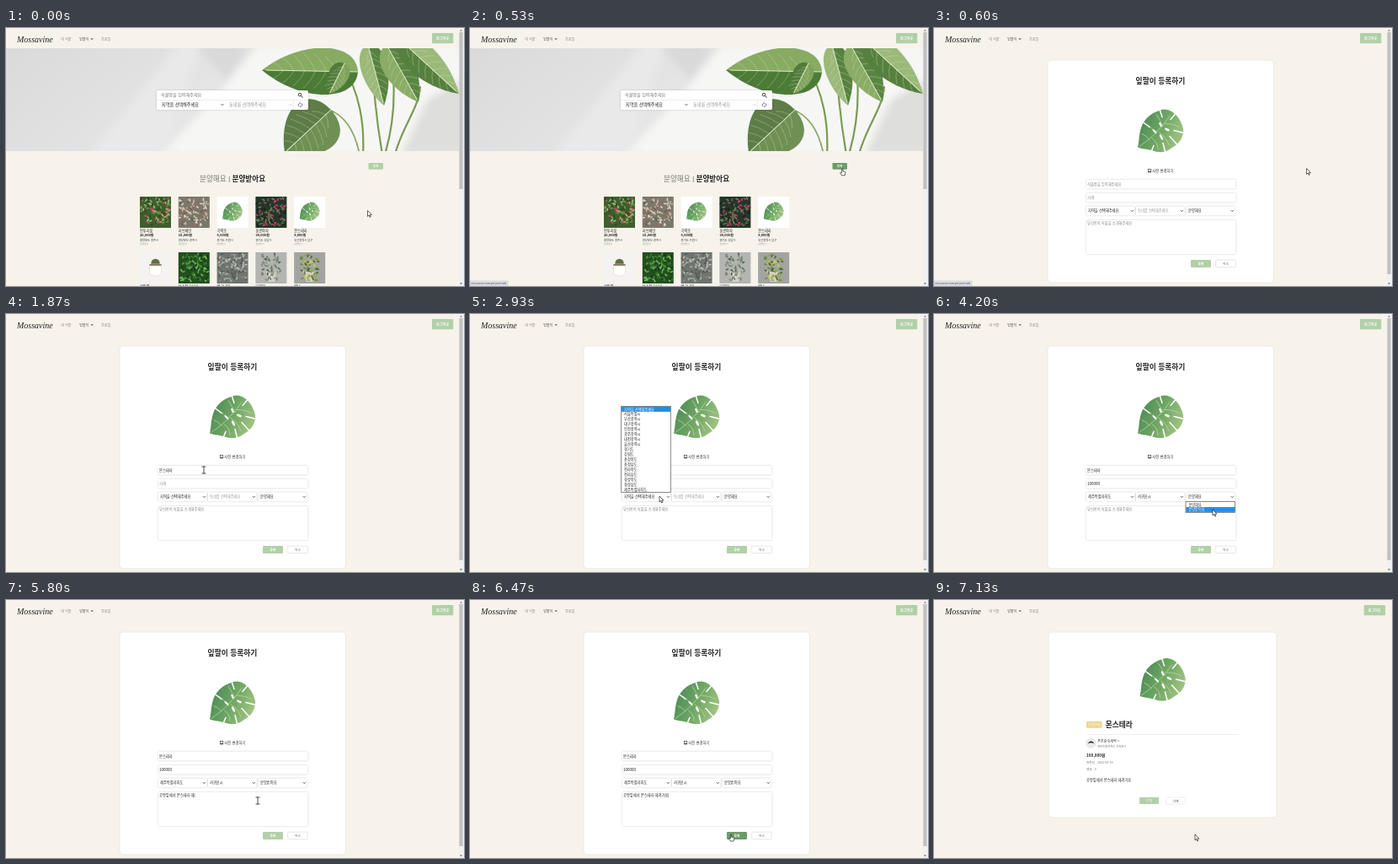
These frames come from a looping animation (544 by 306 pixels, 7.19 s). An HTML page:

```html
<!DOCTYPE html>
<html lang="ko">
<head>
<meta charset="utf-8">
<title>Mossavine</title>
<style>
html, body { margin: 0; width: 100%; height: 100%; overflow: hidden; background: #f7f3eb; }
svg { display: block; width: 100vw; height: 100vh; }
text { font-family: "Noto Sans CJK KR", "Noto Sans CJK", "Noto Sans", sans-serif; white-space: pre; }
.logo { font-family: "Liberation Serif", serif; font-style: italic; }
.lift { filter: drop-shadow(.7px .9px 1px #0003); }
</style>
</head>
<body>
<svg id="stage" viewBox="0 0 544 306"></svg>
<script>
const LOOP = 7190, TICK = 200 / 3;
const GREEN = '#b2d0a8', HOVER = '#6c9c6c', BLUE = '#1e8fee';

// ---- drawing helpers ----
const rect = (x, y, w, h, fill, more = '') =>
  `<rect x="${x}" y="${y}" width="${w}" height="${h}" fill="${fill}" ${more}/>`;
const path = (d, fill, more = '') => `<path d="${d}" fill="${fill}" ${more}/>`;
const stroke = (d, color, w) => path(d, 'none', `stroke="${color}" stroke-width="${w}" stroke-linecap="round"`);
const circle = (x, y, r, fill, more = '') => `<circle cx="${x}" cy="${y}" r="${r}" fill="${fill}" ${more}/>`;
const oval = (x, y, rx, ry, fill, turn) =>
  `<ellipse cx="${x}" cy="${y}" rx="${rx}" ry="${ry}" fill="${fill}" transform="rotate(${turn} ${x} ${y})"/>`;
const text = (x, mid, size, str, fill = '#222', more = '') =>
  `<text x="${x}" y="${mid + size * 0.37}" font-size="${size}" fill="${fill}" ${more}>${str}</text>`;
const group = (id, body) => `<g id="${id}">${body}</g>`;
const MID = 'text-anchor="middle"', BOLD = 'font-weight="700"', MEDIUM = 'font-weight="500"';
const chevron = (x, y) => stroke(`M${x - 1.3} ${y - .6}l1.3 1.3 1.3-1.3`, '#222', .7);

function button(x, y, w, h, label, fill, color, size = 3.8, more = '', weight = MEDIUM) {
  return rect(x, y, w, h, fill, `rx="1" ${more}`) +
    text(x + w / 2, y + h / 2, size, label, color, `${MID} ${weight}`);
}

function random(seed) {
  return () => (seed = (seed * 16807) % 2147483647) / 2147483647;
}

function leaf(x, y, tx, ty, w, dark, light) {
  const len = Math.hypot(tx - x, ty - y), turn = Math.atan2(ty - y, tx - x) * 180 / Math.PI;
  const half = s => `M0 0C${len * .02} ${s * w} ${len * .6} ${s * w} ${len} 0Z`;
  let veins = '';
  for (let i = 1; i < 8; i++) {
    const at = len * i / 9, reach = w * .55 * Math.sin(Math.PI * Math.pow(i / 9, .75));
    for (const s of [-1, 1]) veins += `M${at} 0q${len * .04} ${s * reach * .6} ${len * .12} ${s * reach}`;
  }
  return `<g transform="translate(${x} ${y}) rotate(${turn})">` + path(half(1), dark) + path(half(-1), light) +
    stroke(veins, '#d5e3bb66', .8) + stroke(`M0 0H${len * .95}`, '#dbe8c0', 1) + '</g>';
}

const monstera = (x, y, s) => `<use href="#monstera" transform="translate(${x} ${y}) scale(${s})"/>`;

const defs = `<defs>
<linearGradient id="leafTone" x1="0" y1=".3" x2="1" y2=".7">
<stop stop-color="#4a8a58"/><stop offset=".5" stop-color="#6fa763"/><stop offset="1" stop-color="#a6c588"/></linearGradient>
<linearGradient id="wall" x1="0" x2="1" y2=".3"><stop stop-color="#dadadb"/><stop offset=".4" stop-color="#e2e2e2"/><stop offset="1" stop-color="#f2f2f1"/></linearGradient>
<filter id="soft" x="-20%" y="-20%" width="140%" height="140%"><feGaussianBlur stdDeviation="4"/></filter>
<clipPath id="heroClip"><rect y="24" width="538" height="122"/></clipPath>
<g id="monstera">` +
  path('M27 2C38-2 50 8 54 24 55 33 50 42 40 47 34 52 26 53 18 50 11 48 5 48 0 46 2 38 1 30 5 20 9 11 17 5 27 2Z', 'url(#leafTone)') +
  stroke('M2 45Q22 32 38 9M14 37Q10 32 5 30M22 30Q17 22 11 19M30 21Q26 13 22 7M17 35Q24 40 24 48M25 28Q34 34 37 43M32 18Q43 18 49 22', '#c3dcab', .7) +
  stroke('M55 29L43 26M47 43L38 33M33 53L30 41M16 51L19 44M45 6L39 13M26 1L29 10M6 16L14 22', '#fff', 1.5) +
  oval(20, 27, 1.2, 3.2, '#fff', -45) + oval(27, 19, 1.2, 3, '#fff', -25) +
  oval(28, 34, 1.4, 3.6, '#fff', -25) + oval(35, 25, 1.3, 3.2, '#fff', -65) + '</g></defs>';

// ---- shared page parts ----
const header = x => text(13, 13, 10, 'Mossavine', '#222', 'class="logo"') +
  text(65, 13, 4.15, '내 식물', '#8a8780') + text(87, 13, 4.15, '잎팔이', '#55524d') +
  path('M100.4 12.2h3.4l-1.7 2z', '#6a6762') + text(113, 13, 4.15, '프로필', '#8a8780') +
  button(x, 6, 25.3, 12.2, '로그아웃', GREEN, '#fff', 4.1, '', BOLD);

const scrollbar = bottom => rect(538, 0, 6, 306, '#f1f1f1') + rect(538.4, 5, 4.2, bottom - 5, '#c1c1c1') +
  path('M539 3.4h3l-1.5-1.7z', '#777') + path('M539 302.6h3l-1.5 1.7z', '#555');

const card = (x, w, h) => rect(x, 38, w, h, '#fff', 'rx="4.5" stroke="#e7e2d8" stroke-width=".7"');

// ---- market page ----
function hero() {
  return `<g clip-path="url(#heroClip)">` + rect(0, 24, 538, 122, 'url(#wall)') +
    `<g filter="url(#soft)">` +
    path('M100 150L205 20H232L185 150Z', '#e9e9ea') +
    path('M185 150L255 75 300 20H545V150Z', '#f6f6f5') + path('M225 20H290L262 62Z', '#d9d9da') +
    path('M470 150L500 85 545 60V150Z', '#dededd') + '</g>' +
    stroke('M424 150C426 115 420 75 400 46M447 150C440 110 436 70 434 24M450 150C462 110 464 70 456 24M462 150C470 118 490 96 492 70', '#7d9a52', 2.2) +
    stroke('M420 150C414 120 402 104 384 97', '#8ca763', 1.8) +
    leaf(386, 97, 331, 148, 44, '#5d7d46', '#6f9054') +
    leaf(418, 52, 304, 50, 37, '#88ab62', '#4c7b37') +
    leaf(402, 42, 384, 78, 16, '#517c3c', '#7fa35c') +
    leaf(430, 20, 449, 92, 21, '#9cb97a', '#56823f') +
    leaf(452, 20, 490, 88, 25, '#8aad66', '#5a8444') +
    leaf(468, 14, 538, 78, 25, '#56803f', '#9ab97a') + '</g>';
}

// backdrop, spread of the foliage, foliage colours
const photos = [
  ['#3e5f2e', 17, '#6f9a4c', '#2d4a22', '#9dba78', '#d2456c'],
  ['#7d766b', 17, '#b9b6a6', '#a06f5c', '#5d6650', '#d8d3c6'],
  null,
  ['#26352a', 17, '#4c7343', '#18241b', '#b04769', '#6a8b5c'],
  null,
  ['#f4f3f1', 0],
  ['#234f20', 17, '#56a13f', '#357c2b', '#78bb57', '#173a17'],
  ['#6f756e', 17, '#9ea69b', '#545c54', '#858b83', '#b9bdb4'],
  ['#b4b4b1', 11, '#6f7f68', '#8d9a84', '#566450', '#a9b3a1'],
  ['#a3a4a1', 10, '#6b8a3f', '#4c6a30', '#8fa85a', '#d8c94f']
];

function thumb(i, x, y) {
  if (!photos[i]) return rect(x, y, 37, 37, '#fff') + monstera(x + 6.5, y + 6, .44);
  const [back, spread, ...tones] = photos[i];
  const cx = x + 18.5, rnd = random(71 + i * 97);
  let out = rect(x, y, 37, 37, back);
  if (i > 7) out += path(`M${cx - 6} ${y + 23}h12l-2 12h-8z`, '#d3d1ca');
  for (let n = 0; spread && n < spread * 6; n++) {
    const px = cx + (rnd() * 2 - 1) * spread, py = y + 18 + (rnd() * 2 - 1) * 16;
    out += oval(px, py, 2, .9, tones[Math.floor(rnd() * tones.length)], rnd() * 180);
  }
  if (!spread) out += circle(cx, y + 13, 5.2, '#5f6f45') + path(`M${cx - 7} ${y + 14}h14v9q0 5-7 5t-7-5z`, '#fff', 'stroke="#ddd9d4" stroke-width=".6"') +
    path(`M${cx - 7} ${y + 14}h14v2h-14z`, '#8b7f68');
  return out;
}

function market() {
  const items = [
    ['안투리움', '20,000원', '충청북도 청주시'], ['러브체인', '10,000원', '경상북도 경주시'],
    ['극락조', '5,000원', '경기도 수원시'], ['홍콩야자', '30,000원', '경기도 성남시'],
    ['몬스테라', '5,000원', '부산광역시 남구'], ['선인장'], ['보스턴고사리'], ['베고니아'], ['다육이'], ['칸나']
  ];
  const grid = items.map(([name, price, place], i) => {
    const x = 159 + (i % 5) * 45.8, y = i < 5 ? 200 : 266;
    return thumb(i, x, y) + text(x, y + 40.3, 4.2, name, '#222', MEDIUM) +
      (price ? text(x, y + 46, 3.9, price, '#111', BOLD) + text(x, y + 51.5, 3.3, place, '#333') +
        text(x, y + 56.4, 2.8, '분양받기', '#999') : '');
  }).join('');
  return header(506) + hero() +
    `<g class="lift">${rect(179, 74, 180, 23, '#fff', 'rx="2"')}</g>` +
    rect(179, 85, 180, .5, '#ddd') + rect(341, 85, .5, 12, '#ddd') +
    text(184, 79.5, 5.1, '식물명을 입력해주세요', '#777') + text(185, 91.2, 5.15, '지역을 선택해주세요') +
    text(265, 91.2, 5.15, '동네를 선택해주세요', '#999') + chevron(257, 91) + stroke('M336.7 90.4l1.3 1.3 1.3-1.3', '#aaa', .6) +
    circle(349, 79, 1.8, 'none', 'stroke="#222" stroke-width=".8"') + stroke('M350.5 80.5l1.8 1.8', '#222', .9) +
    stroke('M347.7 92.6a2.3 2.3 0 0 1 2-3.7M351.3 89.6a2.3 2.3 0 0 1-2 3.7', '#333', .7) +
    rect(430.5, 160, 17.5, 7.8, GREEN, 'id="writeBtn" rx="1.2"') + text(439.2, 163.9, 3.4, '등록', '#fff', `${MID} ${BOLD}`) +
    text(230, 179.2, 8.6, '분양해요', '#77756f', 'font-weight="300"') + rect(264.9, 176, .6, 7, '#555') +
    text(268.5, 179.2, 8.6, '분양받아요', '#222', BOLD) + grid + scrollbar(191);
}

// ---- form page ----
const field = (y, h, x = 181, w = 177.5) => `<g class="lift">${rect(x, y, w, h, '#fff', 'rx=".8"')}</g>`;
const slots = [183, 242, 302];

function form() {
  return header(506) + card(135, 268.5, 264) + text(269, 63, 8.75, '잎팔이 등록하기', '#222', `${MID} ${BOLD}`) +
    monstera(242, 95.5, 1) +
    rect(254.2, 167.6, 3.6, 3.4, 'none', 'stroke="#333" stroke-width=".6"') + path('M254.6 170.8l1.2-1.6 .8 .8 .6-.5 .6 1.3z', '#333') +
    text(259.3, 169.4, 4.35, '사진 변경하기', '#333', MEDIUM) +
    field(180, 10.5) + field(196, 10.5) + field(228, 40) +
    slots.map(x => field(211.5, 10.5, x - 2, 57.5) + chevron(x + 52.3, 217)).join('') +
    text(182, 185.2, 4.25, '', '', 'id="name"') + text(182, 201.2, 4.5, '', '', 'id="price"') +
    text(182, 231.7, 4.25, '', '', 'id="note"') +
    slots.map((x, i) => text(x, 216.9, 4.25, '', '', `id="pick${i}"`)).join('') +
    rect(0, 0, .4, 5, '#222', 'id="caret"') +
    rect(305, 275, 24, 9, GREEN, 'id="sendBtn" rx="1.2"') + text(317, 279.5, 3.9, '등록', '#fff', `${MID} ${BOLD}`) +
    button(334.7, 275.2, 23.6, 8.6, '취소', '#fff', '#777', 3.9, 'stroke="#ccc" stroke-width=".5"') + scrollbar(292);
}

// ---- detail page ----
function detail() {
  return header(510.7) + card(136, 271, 220) + monstera(244.5, 68, 1) +
    button(181, 144, 18.5, 7.8, '분양받아요', '#efd48c', '#fff', 3.3) +
    text(203.7, 148, 8.7, '몬스테라', '#222', BOLD) + rect(181, 159.3, 181, .5, '#ddd') +
    circle(186.5, 169.7, 5.6, '#eceae8', 'stroke="#ccc" stroke-width=".4"') + path('M183.2 170.4a3.4 3.6 0 0 1 6.7 0q-3.3-2.2-6.7 0z', '#222') +
    text(194, 167.2, 4.15, '푸른숲속새싹 &gt;', '#333', MEDIUM) + text(194, 173.4, 3.3, '제주특별자치도 서귀포시', '#777') +
    text(181, 184.2, 4.7, '100,000원', '#222', BOLD) + text(181, 192.2, 3.6, '등록일 : 2022-08-19', '#777') +
    text(181, 200.3, 3.6, '댓글 : 0', '#777') + text(181, 213.6, 4.25, '공항앞에서 몬스테라 데려가요', '#222', MEDIUM) +
    button(244, 234, 23.2, 8, '수정', GREEN, '#fff') +
    button(275.5, 234.2, 23, 7.8, '삭제', '#fff', '#555', 3.8, 'stroke="#ddd" stroke-width=".5"');
}

// ---- dropdowns ----
const regions = '지역을 선택해주세요,서울특별시,부산광역시,대구광역시,인천광역시,광주광역시,대전광역시,울산광역시,경기도,강원도,충청북도,충청남도,전라북도,전라남도,경상북도,경상남도,제주특별자치도'.split(',');
const cities = ['동네를 선택해주세요', '제주시', '서귀포시'];
const kinds = ['분양해요', '분양받아요'];
const ROW = 5.95;
const menus = [
  { list: regions, x: 179.7, y: 110, from: 2800, to: 3270 },
  { list: cities, x: 239.5, y: 223, from: 3470, to: 3670 },
  { list: kinds, x: 299, y: 223, from: 3930, to: 4270 }
];
const menuSvg = (m, i) => group('menu' + i,
  rect(m.x, m.y - .4, 58.6, m.list.length * ROW + .8, '#fff', 'stroke="#555" stroke-width=".7"') +
  rect(m.x + .3, m.y, 58, ROW, BLUE, `id="bar${i}"`) +
  m.list.map((s, n) => text(m.x + 3.4, m.y + (n + .5) * ROW, 4.2, s)).join(''));

// ---- pointer ----
const arrow = path('M0 0V7L1.6 5.5 2.7 8 3.8 7.5 2.7 5.1H4.9Z', '#fff', 'stroke="#111" stroke-width=".65"');
const hand = path('M-.6 0Q0-.8 .6 0V3L3.2 3.6Q4 4 3.8 5L3 8H-.6L-2.6 5Q-2.2 4-.6 5Z', '#fff', 'stroke="#111" stroke-width=".65"');
const beam = stroke('M-2-4H2M0-4V4M-2 4H2', '#222', .8);
// time, x, y
const route = [
  [0, 429.5, 216.5], [70, 430, 214], [270, 437, 185], [470, 442, 167], [600, 442.5, 166.5], [730, 435, 168],
  [1200, 235, 185], [2070, 235, 185], [2270, 228, 201], [2600, 228, 201], [2730, 225, 216], [2930, 225, 216],
  [3200, 212, 208], [3270, 212, 208], [3400, 275, 217], [3470, 275, 217], [3600, 272, 237], [3670, 272, 237],
  [3870, 328, 217], [3930, 328, 217], [4130, 331, 232], [4270, 331, 232], [4400, 299, 238],
  [6200, 299, 238], [6470, 310, 278], [LOOP, 310, 278]
];

function along(keys, t, col) {
  const i = Math.max(1, keys.findIndex(k => k[0] >= t));
  const a = keys[i - 1], b = keys[i];
  const k = Math.min(1, Math.max(0, (t - a[0]) / (b[0] - a[0])));
  return a[col] + (b[col] - a[col]) * k;
}

// ---- typing ----
function keystrokes(str) {
  const first = 'ㄱㄲㄴㄷㄸㄹㅁㅂㅃㅅㅆㅇㅈㅉㅊㅋㅌㅍㅎ', out = [''];
  let done = '';
  for (const ch of str) {
    const code = ch.charCodeAt(0) - 0xac00;
    if (code >= 0) {
      out.push(done + first[Math.floor(code / 588)], done + String.fromCharCode(0xac00 + code - code % 28));
      if (code % 28) out.push(done + ch);
    } else out.push(done + ch);
    done += ch;
  }
  return out;
}

const typed = [
  { id: 'name', hint: '식물명을 입력해주세요', keys: keystrokes('몬스테라'), pace: [[1400, 0], [1870, 9], [LOOP, 9]], y: 182.7 },
  { id: 'price', hint: '가격', keys: keystrokes('100000'), pace: [[2200, 0], [2600, 6], [LOOP, 6]], y: 198.7 },
  { id: 'note', hint: '당신만의 식물을 소개해주세요', keys: keystrokes('공항앞에서 몬스테라 데려가요'), pace: [[4730, 0], [5470, 14], [5800, 26], [6200, 32], [LOOP, 32]], y: 229.3 }
];

document.getElementById('stage').innerHTML = defs + rect(0, 0, 544, 306, '#f7f3eb') +
  group('market', market()) + group('form', form() + menus.map(menuSvg).join('')) + group('detail', detail()) +
  group('status', rect(0, 300, 45, 6, '#dee1e6', 'stroke="#bbb" stroke-width=".4"') + text(1.5, 303.1, 3, 'mossavine.example/post/add', '#444')) +
  group('pointer', group('arrow', arrow) + group('hand', hand) + group('beam', beam));

const el = id => document.getElementById(id);
const show = (id, on) => { el(id).style.display = on ? '' : 'none'; };
const put = (id, str, color) => { el(id).textContent = str; el(id).setAttribute('fill', color); };

function draw(t) {
  const x = along(route, t, 1), y = along(route, t, 2);
  const inForm = t >= 600 && t < 6600;
  show('market', t < 600);
  show('form', inForm);
  show('detail', t >= 6600);
  show('status', t >= 400 && t < 730);

  const overWrite = t >= 400 && t < 600, overSend = t >= 6470 && t < 6600;
  el('writeBtn').setAttribute('fill', overWrite ? HOVER : GREEN);
  el('sendBtn').setAttribute('fill', overSend ? HOVER : GREEN);

  const open = menus.some(m => t >= m.from && t < m.to);
  const inField = inForm && !open && x > 181 && x < 358 &&
    (y > 180 && y < 190.5 || y > 196 && y < 206.5 || y > 228 && y < 268);
  const shape = overWrite || overSend ? 'hand' : inField ? 'beam' : 'arrow';
  for (const id of ['arrow', 'hand', 'beam']) show(id, id === shape);
  el('pointer').setAttribute('transform', `translate(${x} ${y})`);
  if (!inForm) return;

  show('caret', false);
  for (const f of typed) {
    const n = Math.floor(along(f.pace, t, 1) + .01), str = f.keys[n];
    put(f.id, str || f.hint, str ? '#222' : '#888');
    if (n && (n < f.keys.length - 1 || f.id === 'note')) {
      show('caret', true);
      el('caret').setAttribute('x', 182.3 + el(f.id).getComputedTextLength());
      el('caret').setAttribute('y', f.y);
    }
  }

  const placed = t >= menus[0].to;
  put('pick0', placed ? regions[16] : regions[0], '#222');
  put('pick1', t >= menus[1].to ? cities[2] : cities[0], placed ? '#222' : '#999');
  put('pick2', t >= menus[2].to ? kinds[1] : kinds[0], '#222');

  menus.forEach((m, i) => {
    show('menu' + i, t >= m.from && t < m.to);
    const at = Math.floor((y - m.y) / ROW), row = at >= 0 && at < m.list.length ? at : 0;
    el('bar' + i).setAttribute('y', m.y + row * ROW);
    el('menu' + i).querySelectorAll('text').forEach((s, n) => s.setAttribute('fill', n === row ? '#fff' : '#222'));
  });
}

const start = performance.now();
function frame() {
  const t = (performance.now() - start) % LOOP;
  // the screen advances fifteen times a second, on tens of milliseconds
  draw(Math.round(Math.floor((t + 3.4) / TICK) * TICK / 10) * 10);
  requestAnimationFrame(frame);
}
frame();
</script>
</body>
</html>
```
